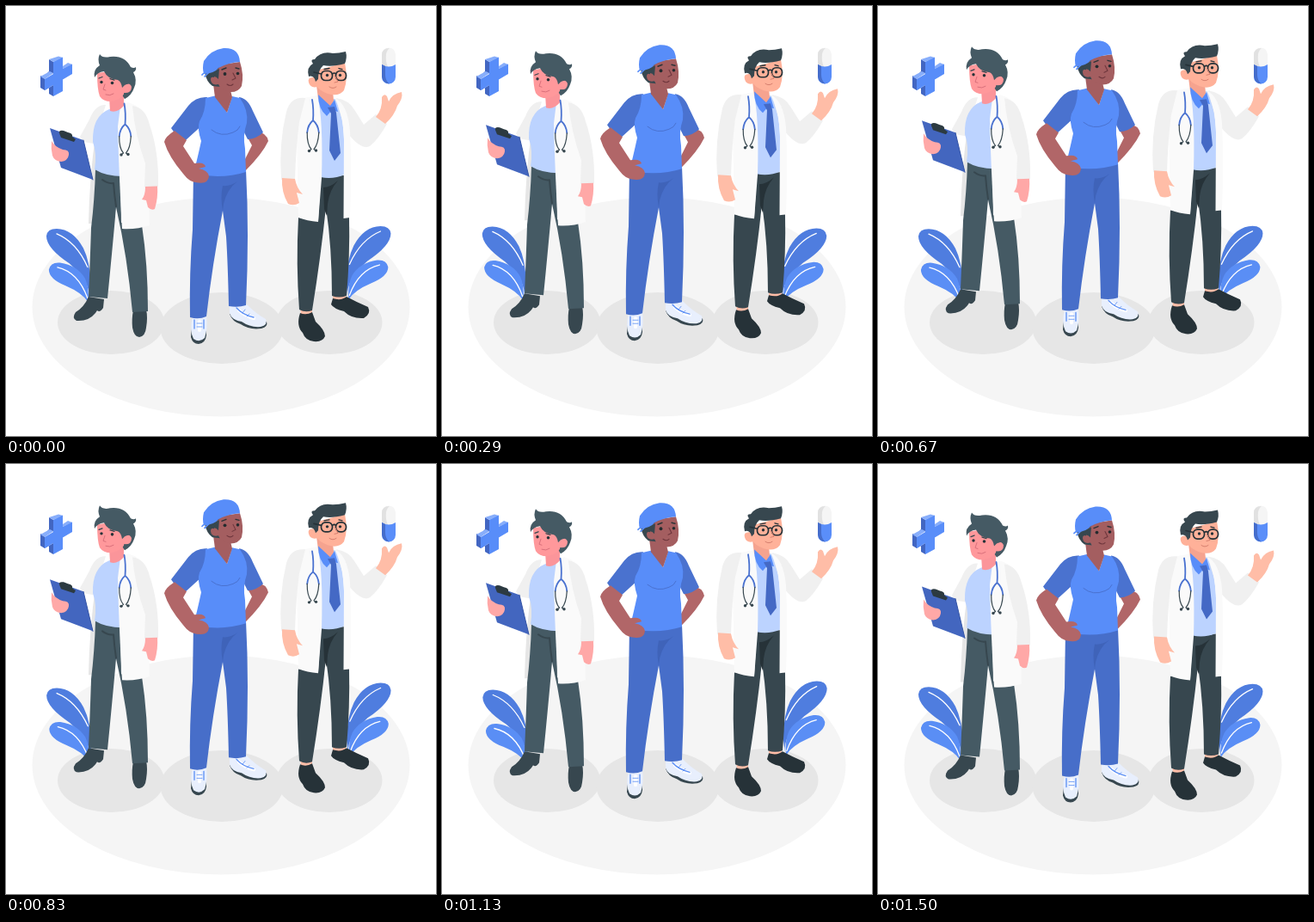
These frames come from a looping animation (500 px wide and 500 px high, 1.54 s). An HTML page:

```html
<!DOCTYPE html>
<html lang="en">
<head>
<meta charset="utf-8">
<title>Medical team</title>
<style>
html, body { margin: 0; width: 100%; height: 100%; overflow: hidden; background: #fff; }
svg { display: block; width: 100%; height: 100%; }
.line { fill: none; stroke-linecap: round; stroke-linejoin: round; }
.dark { stroke: #37474f; }
.blue { stroke: #4a72d0; }
</style>
</head>
<body>
<svg viewBox="0 0 500 500">
  <defs>
    <g id="plant">
      <path fill="#4f7ddf" d="M97 341Q99 322 74 300Q47 282 47 268Q48 259.500 59 259.500Q78 260 90 282Q98 298 99 325Z"/>
      <path fill="#5a8ef5" d="M96 345Q89 334 70 326Q50 318 50 307Q52 298 63 299Q83 302 92 317Q97 327 96 345Z"/>
      <path class="line" stroke="#fff" stroke-width="1.300" d="M59 265.500Q82 275 95 304M60 304.500Q84 310 95 340"/>
    </g>
    <g id="scope">
      <path class="line blue" stroke-width="1.800" d="M-1-29Q1-18 0-5Q-6 0-6.800 9M0-5Q6 0 6.800 9"/>
      <path class="line dark" stroke-width="1.200" d="M-6.800 9Q-7 23-2 28.500L-4 30M6.800 9Q6 23 1 28.500L3 30"/>
      <g fill="#37474f"><circle cx="-4.500" cy="30.500" r="1.700"/><circle cx="3.500" cy="30" r="1.700"/></g>
    </g>
  </defs>

  <ellipse cx="250" cy="350" rx="219.500" ry="127.500" fill="#f5f5f5"/>
  <g fill="#e6e6e6">
    <ellipse cx="122" cy="368" rx="62" ry="37"/>
    <ellipse cx="251" cy="374.500" rx="71.500" ry="41.500"/>
    <ellipse cx="376" cy="368" rx="61.500" ry="37"/>
  </g>

  <g id="plus">
    <path fill="#4266c2" d="M50 62L55 65V78L45 84L40 81V95L45 98L55 92V105L50 102V89H45V81L50 76Z"/>
    <path fill="#88aefb" d="M50 62L61 58.500L66 60L55 65ZM40 82L51 76L55 78L45 85ZM66 70L72 66L77 68L66 73Z"/>
    <path fill="#588df9" d="M55 65L66 59.500V73L77 67.500V79L66 85.500V99L55 105V92L45 98V85L55 79Z"/>
  </g>
  <g id="pill">
    <path fill="#f5f5f5" d="M437 56.500A8 8 0 0 1 453 56.500V68Q445 73 437 68Z"/>
    <path fill="#e1e1e1" d="M446 49Q437 49 437 57V68Q440 71 444 71Q441 64 442 56Q443 51 446 49Z"/>
    <path fill="#5a8ef9" d="M437 68Q445 73 453 68V82.500A8 8 0 0 1 437 82.500Z"/>
    <path fill="#456dcb" d="M437 68V82Q438 90 446 90.500Q441 87 441 80V70Z"/>
  </g>

  <g id="leafL"><use href="#plant"/></g>
  <g id="leafR"><use href="#plant" transform="matrix(-1 0 0 1 494.500 -4)"/></g>

  <g id="people">
    <g id="clipDoctor">
      <path fill="#37474f" d="M96 338L114 341L113 351Q109 357 106 354L104 357Q96 367 82 366Q76 363 81 356Q91 350 96 338ZM148 354Q146 363 147 374Q149 385 155 385Q162 384 163 374Q165 362 163 353Z"/>
      <path fill="#e6e6e6" d="M106 150L104 195L102 253L96 253Q97 200 104 150Z"/>
      <path fill="#455a64" d="M104 190L133 195L134 252L158 255Q165 300 165 355L147 356Q141 290 128 234Q123 290 118 340L96 338Q98 290 99 258Q103 225 104 190Z"/>
      <path class="line" stroke="#37474f" stroke-width="2" d="M112 202Q119 207 125 206Q126 220 128 233"/>
      <path fill="#f0f0f0" d="M116 115Q104 114 97 132L86 152L90 158L102 160L108 140Z"/>
      <path fill="#bcd3ff" d="M120 120L135 117L136 198Q116 198 103 190Q106 172 101 158Q100 128 120 120Z"/>
      <path fill="#fafafa" d="M133 116L142 112Q156 116 160 126Q165 175 167 255Q152 260 135 259Q131 190 130 140Z"/>
      <path fill="#f0f0f0" d="M147 116Q162 118 167 138Q178 170 177 210L161 211L162 183Q150 150 147 116Z"/>
      <path fill="#ffa8a7" d="M162 210L176 209.500Q177 223 173 236Q169 238 165 234L163 226L158 225Q162 220 162 210Z"/>
      <path fill="#fb959a" d="M120 106L137 100L137 116Q129 125 121 122Z"/>
      <path fill="#455a64" d="M126 76H148L146 98L138 108L130 96Z"/>
      <path fill="#ff989b" d="M106 78Q106 97 109 105Q113 111 122 111Q134 109 138 101Q147 102 147 94Q146 88 140 91L133 74Z"/>
      <path fill="#455a64" d="M103 83Q101 74 109 69Q106 62 109 56Q112 61 121 59Q138 57 145 71Q149 73 151 71Q152 75 148 77Q153 86 149 95Q146 104 138 108L137 101Q146 102 146 94Q144 88 138 92L135 95Q134 88 130 86Q118 85 114 76Q106 77 103 83Z"/>
      <path class="line dark" stroke-width="1.300" d="M108 84L112 82.500M121 84.500L126 86"/>
      <g fill="#263238"><circle cx="111" cy="88.500" r="1.700"/><circle cx="123.500" cy="89.500" r="1.800"/></g>
      <path class="line" stroke="#d9707b" stroke-width="1" d="M115 91L113 97L116 98M116 103Q121 105 125 102"/>
      <use href="#scope" x="138.500" y="142.500"/>
      <path fill="#4366bf" d="M51 142L90 156L101 202L64 188Z"/>
      <path class="line" stroke="#3454a5" stroke-width="1" d="M90 156L101 202"/>
      <path fill="#2c3a41" d="M62 148Q61 144 67 145L72 147Q78 148 77 152L81 155L79 158L64 153Z"/>
      <path fill="#ffa8a7" d="M53 157Q57 164 66 167Q74 167 73 173Q72 180 64 181Q56 180 54 174Q52 166 53 157Z"/>
    </g>

    <g id="surgeon">
      <path fill="#37474f" d="M216 374L215 385Q217 393 224 393Q232 392 233 383V371ZM260 358Q263 367 273 370Q283 377 297 375Q305 373 303 367Z"/>
      <path fill="#e8effd" d="M217 361L233 360Q235 374 231 386Q225 392 218 387Q213 377 217 361ZM260 348L280 347Q291 358 302 364Q305 371 296 373Q284 374 274 367Q262 365 260 357Z"/>
      <path class="line" stroke="#fff" stroke-width="4" d="M225 367L225 377M271 354Q279 361 288 363"/>
      <path class="line" stroke="#5a8ef5" stroke-width="1.300" d="M219 365L219 375M230 365V375M268 351Q275 359 288 362"/>
      <path class="line" stroke="#5a8ef5" stroke-width=".8" d="M222 369H228M222 373H228M278 353L275 357M283 358L280 361"/>
      <path fill="#476ec9" d="M218 192L279 190Q283 265 279 348Q270 351 259 349Q258 300 256 268L252 238Q240 300 233 361Q224 365 214 362Q213 310 217 260Z"/>
      <path fill="#3f63b9" d="M252 209Q261 210 269 204Q257 213 253 230L252 238Q249 222 252 209Z"/>
      <path fill="#b16668" d="M291 146Q303 147 305 157Q298 172 278 192L277 180L286 162L281 153Z"/>
      <path fill="#4a72cf" d="M234 106Q221 105 212 116L192 142Q198 152 209 156L231 136ZM271 106Q281 107 287 122L299 147Q292 154 281 155L272 137Z"/>
      <path fill="#588df9" d="M232 107L245 104L257 124L263 105L272 107Q282 121 280 136Q275 150 278 166L279 193Q251 202 218 195Q222 180 227 157Q222 142 225 134Q232 123 232 107Z"/>
      <path class="line blue" stroke-width="1" d="M239 144Q250 153 264 147Q270 145 272 140"/>
      <path fill="#b16668" d="M196 145L210 156L206 163L219 183Q231 181 232 187L224 189Q235 191 236 198Q235 207 224 205.500Q214 206 206 195Q189 175 184 158Q185 152 196 145Z"/>
      <path fill="#a45e60" d="M241 91L261 98L263 106L257 124L243 106Z"/>
      <path fill="#37474f" d="M231 77L249 70L249 94L240 93Q233 88 231 77Z"/>
      <path fill="#a45e60" d="M242 78L251 68L272 65Q277 80 274 93Q270 101 259 100Q249 97 247 91Q239 93 238 86Q238 81 242 83Z"/>
      <path fill="#37474f" d="M238 78L248 73L247 85Q243 80 239 83Z"/>
      <path fill="#588df9" d="M230 79Q228 72 230 64Q238 51 253 49Q271 48 272 65Q258 66 247 72Q243 78 230 79Z"/>
      <path class="line" stroke="#588df9" stroke-width="1.700" d="M236 77Q230 77 228 80M236 77L231 82"/>
      <path class="line" stroke="#2e3438" stroke-width="1.400" d="M251 74L256 72M267 72L271 73"/>
      <g fill="#252b2e"><circle cx="254.500" cy="79" r="1.900"/><circle cx="269.500" cy="78.500" r="1.800"/></g>
      <path class="line" stroke="#6f373d" stroke-width="1.100" d="M264 78L267 84L263 86M257 91Q261 94 264 91"/>
    </g>

    <g id="pillDoctor">
      <path fill="#ffbda7" d="M342 350H356V358L343 359ZM380 334H395V342H380Z"/>
      <path fill="#263238" d="M342 357Q349 360 356 356L360 367Q371 377 371 384Q368 391 358 390Q348 389 345 380Q337 372 342 357ZM380 340Q390 343 396 338Q407 344 421 350Q425 358 416 363Q402 364 393 355Q381 352 378 347Z"/>
      <path fill="#37474f" d="M366 198L393 197V246L399 246Q400 290 396 337Q387 340 379 337Q379 280 372 234Q366 292 356 354Q348 357 341 353Q337 300 340 246L363 250Z"/>
      <path fill="#263238" d="M369 211Q377 211 386 203Q376 214 374 230L373 244L370 236Z"/>
      <path fill="#bcd3ff" d="M363 108L385 108Q394 125 394 196Q380 202 366 199Z"/>
      <path fill="#f0f0f0" d="M384 107Q399 109 406 122L416 138L430 126L443 137Q433 155 423 163Q414 168 399 150Q389 132 384 107Z"/>
      <path fill="#ffbda7" d="M430 129Q438 120 437 106Q440 101 443 105L445 111Q449 102 460 100Q462 107 455 116Q452 127 441 137Z"/>
      <path fill="#fafafa" d="M382 107Q397 113 400 145Q402 190 400 246L392.500 247L393 155Q392 125 382 107Z"/>
      <path fill="#fafafa" d="M346 107L362 104Q369 130 367 200L363 251Q350 250 340 246Q339 190 338 150Z"/>
      <path fill="#f0f0f0" d="M348 107Q331 105 326 123Q317 160 320 202L336 203Q337 165 341 135Z"/>
      <path fill="#ffbda7" d="M321 200L336 201Q338 212 345 219L338 217L341 229Q335 233 328 230Q320 216 321 200Z"/>
      <path fill="#f5a38f" d="M361 92L380 99L381 110L378 117L363 108Z"/>
      <path fill="#588df9" d="M363 103L377 116L382 109L386 123L379 121L373 128Q363 120 363 103Z"/>
      <path fill="#4469c5" d="M374 118L382 117L384 124L389 171L382 180L376 168L378 125Z"/>
      <path fill="#ffb199" d="M361 75L394 66Q398 85 393 98Q387 106 374 102Q364 98 362 94Q354 96 352 89Q350 82 359 83Z"/>
      <path fill="#37474f" d="M352 82Q349 71 357 67Q353 62 359 62Q366 52 380 55Q387 55 395 53Q397 60 394 67Q379 71 369 69Q363 74 363 85L360 88Q358 80 352 82Z"/>
      <g class="line" stroke="#263238" stroke-width="1.700">
        <rect x="366.500" y="75.500" width="13" height="11" rx="5"/>
        <rect x="383.500" y="75.500" width="12" height="11" rx="5"/>
        <path d="M379.500 79Q382 77 383.500 79M366.500 79L358 77"/>
        <path stroke-width="1.300" d="M370 73.500L376 72.500M387 72.500L391 73.500"/>
      </g>
      <g fill="#263238"><circle cx="373.500" cy="80.500" r="1.700"/><circle cx="388.500" cy="80.500" r="1.700"/></g>
      <path class="line" stroke="#d6806f" stroke-width="1" d="M383 82L386 88L382 89M376 94Q380 97 384 94"/>
      <use href="#scope" x="357" y="138"/>
    </g>
  </g>
</svg>
<script>
const LOOP = 1540, LEAD = 60, LIFT = 10, REST = 0.8, SWAY = 1;
const get = id => document.getElementById(id);
const people = get('people'), leaves = [get('leafL'), get('leafR')];

// Triangle wave: 0 at the ends, 1 halfway through the loop.
function wave(ms) {
  const p = (ms % LOOP + LOOP) % LOOP / LOOP;
  return 1 - Math.abs(2 * p - 1);
}

function draw(ms) {
  const t = ms + LEAD;
  const angle = SWAY * (2 * wave(t + LOOP / 4) - 1);
  people.setAttribute('transform', `translate(0 ${REST - LIFT * wave(t)})`);
  for (const leaf of leaves) leaf.setAttribute('transform', `rotate(${angle} 250 250)`);
}

const start = performance.now();
function tick() {
  draw(performance.now() - start);
  requestAnimationFrame(tick);
}
draw(0);
requestAnimationFrame(tick);
</script>
</body>
</html>
```
